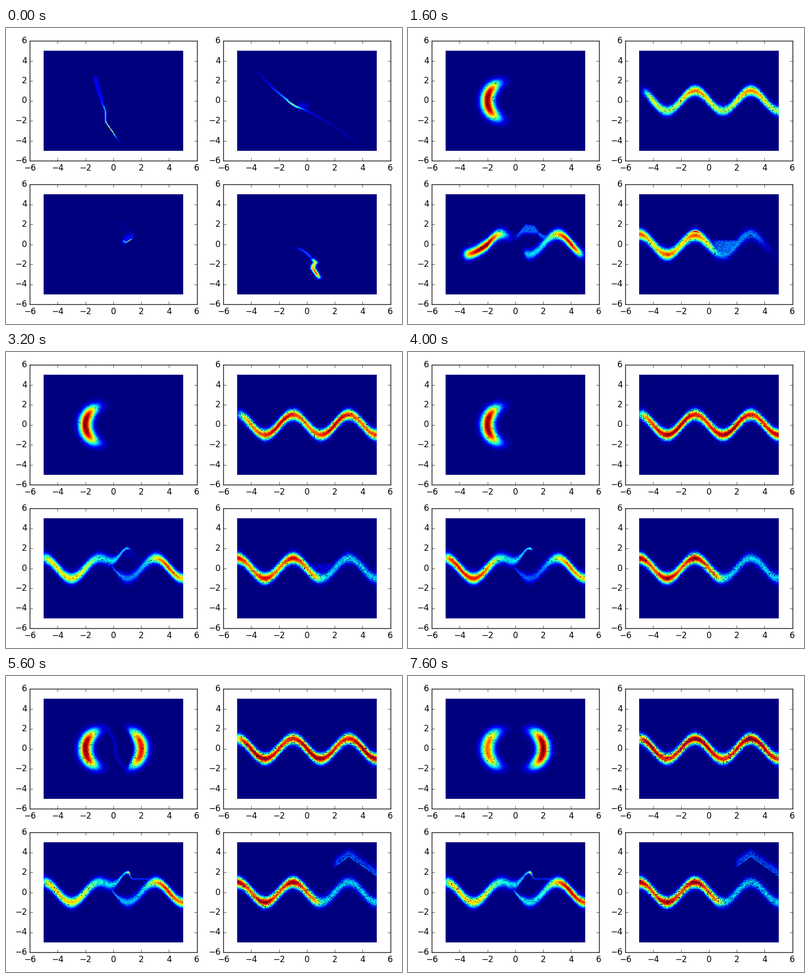
Animation of 800x600 px, one loop 8 s. Source, as a matplotlib script:

```python
import numpy as np
import matplotlib.pyplot as plt
from matplotlib.animation import FuncAnimation

FRAMES, INTERVAL, BINS = 20, 400, 200

plt.rcParams.update({
    "font.family": "DejaVu Sans", "font.size": 12, "axes.linewidth": 1.0,
    "xtick.direction": "in", "ytick.direction": "in",
    "xtick.top": True, "ytick.right": True,
    "xtick.major.size": 4, "ytick.major.size": 4,
    "xtick.major.width": 0.5, "ytick.major.width": 0.5,
    "xtick.major.pad": 4, "ytick.major.pad": 4,
    "ytick.alignment": "center",
})

centers = (np.arange(BINS) + 0.5) * 10 / BINS - 5
X, Y = np.meshgrid(centers, centers)
WAVE = -np.sin(np.pi * X / 2)
BUMPED = WAVE + 3 * np.exp(-0.5 * ((X - 1) / 0.6) ** 2)


def bell(d, width):
    return np.exp(-0.5 * (d / width) ** 2)


def step(d, soft=0.12):
    return 0.5 * (1 + np.tanh(d / (2 * soft)))


def ramp(frame, *points):
    """Straight-line easing through (frame, value) points."""
    return np.interp(frame, *zip(*points))


def path(along, across, width, *points):
    """Thin ridge following a line through a few points."""
    at, center = zip(*points)
    inside = step(along - at[0], .08) * step(at[-1] - along, .08)
    return inside * bell(across - np.interp(along, at, center), width)


def blend(*layers):
    return np.maximum.reduce(layers)


# Collapsed densities at the start of the loop
def start_one():
    height = .13 * step(Y + 4.2, .2) + .5 * bell(Y + 1.5, .6) + .65 * bell(Y + 2.9, .45)
    return height * path(Y, X, .03 + .08 * step(Y + .2, .3), (-4.6, .68),
                         (-2.3, -.47), (-2, -.57), (-1, -.57), (-.2, -.8), (2.4, -1.33))


def start_two():
    height = .05 + .3 * bell(X + 1, .35) + .25 * bell(X + 1.3, 1)
    line = path(X, Y, .08, (-3.6, 2.98), (-2.4, 1.2), (-1.2, -.2), (-.8, -.55),
                (-.2, -.85), (1.8, -2.4), (3.4, -3.95))
    glow = .09 * bell(X + .3, .25) * bell(Y + .5, .25)
    return blend(height * line, glow)


def start_three():
    line = path(X, Y, .035, (.8, .07), (1.37, .58))
    arc = path(Y, X, .06, (.6, 1.36), (1, 1.32), (1.8, .8), (2.5, 0))
    glow = .28 * bell(X - .78, .1) * bell(Y - .28, .14)
    wedge = .15 * bell(X - 1.05, .2) * bell(Y - .6, .25) * step(Y - .8 * X + .5, .05)
    return blend(.8 * bell(X - 1.05, .25) * line,
                 (.04 + .2 * bell(Y - .6, .3)) * arc, glow, wedge)


def start_four():
    tail = .22 * path(Y, X, .1, (-1.45, .4), (-.8, -.08), (-.35, -.65))
    body = path(Y, X, .12, (-3.35, .86), (-2.4, .43), (-2.1, .47),
                (-1.8, .62), (-1.5, .43))
    return blend(tail, (.66 + .2 * bell(Y + 2.8, .3)) * body)


def crescents(frame):
    if frame == 0:
        return start_one()
    ring = bell(np.hypot(X, Y) - 2, .37)
    left = ramp(frame, (14, 1), (17, .8)) * ring * bell(X + 2, .6)
    right = ramp(frame, (10, 0), (14, .9), (17, 1)) * ring * bell(X - 2, .6)
    cut = ramp(frame, (14, 1), (17, 0))
    right = right * (1 - cut * step(1.4 - .12 * Y ** 2 - X, .07))
    thread = path(Y, X, .08, (-2.2, .9), (-.8, .22), (.9, .02), (2.4, -.5))
    return blend(left, right, ramp(frame, (10, 0), (12, .12), (19, 0)) * thread)


def wave(frame):
    if frame == 0:
        return start_two()
    level = ramp(frame, (4, .66), (6, .82), (10, .93))
    ripple = ramp(frame, (4, .12), (10, .06)) * np.cos(1.6 * (X - 3) + .4 * frame - 1.6)
    reach = step(X + ramp(frame, (1, 4), (4, 4.5), (14, 5.1)), .2)
    reach = reach * step(ramp(frame, (1, 4.3), (4, 5.6)) - X, .15)
    return (level + ripple) * reach * bell(Y - WAVE, ramp(frame, (4, .35), (10, .38)))


def split_wave(frame):
    if frame == 0:
        return start_three()
    early = ramp(frame, (4, 1), (6, 0))

    # Left band, narrowing into a wing that ends in a bright tip
    stretched = np.where(X < -2, -2 + (X + 2) * (1 - .4 * early), X)
    bent = BUMPED - WAVE - np.sin(np.pi / 2 * stretched)
    level = ramp(frame, (4, .75), (6, .45), (10, .9), (14, .7))
    height = .35 + (level - .35) * step(-1.6 - X, .35) + .35 * early * bell(X + 1.9, .9)
    tip = ramp(frame, (8, 0), (14, .5)) * bell(X - 1.1, .08)
    edge = ramp(frame, (3, -3.2), (4, -3.6), (5, -3.9), (6, -5))
    wing = step(X - edge) * step((1 - early) * 1.8 - .6 - X, .04 + .2 * early)
    left = (height + tip) * wing * bell(Y - bent, .36 - .27 * step(X - .3, .2))

    # Right band, faint through the trough
    floor = ramp(frame, (4, .35), (10, .22), (17, .38))
    rise = step(X - 2.7, .3) * (.45 + .15 * bell(X - 3.8, .5))
    fade = step(ramp(frame, (6, 4.7), (10, 6)) - X, .15)
    right = (floor + rise) * fade * step(X + .15 - .8 * early, .06)
    right = right * bell(Y - WAVE, .07 + .27 * step(X - .4, .15))

    # Thin bridge between the two
    top = np.minimum(BUMPED + .2, 2.15 - .2 * X)
    base = np.minimum(1.05, BUMPED - .3)
    sheet = step(top - Y, .04) * step(Y - base, .08) * step(X, .1) * step(2.8 - X, .1)
    tail = step(X - 1.08, .02) * step(3 - X) * bell(Y - 1.33 - .7 * bell(X - 1.05, .12), .06)
    return blend(left, right, ramp(frame, (4, .23), (6, .12), (9, 0)) * sheet,
                 ramp(frame, (9, 0), (14, .2)) * (1 + 2 * bell(X - 1.1, .1)) * tail)


def forked_wave(frame):
    if frame == 0:
        return start_four()
    early = ramp(frame, (4, 1), (8, 0))
    low = ramp(frame, (4, .28), (6, .35))
    high = ramp(frame, (4, .75), (10, .9)) + .08 * np.cos(np.pi * (X + 1))
    reach = step(ramp(frame, (4, 4), (6, 5), (10, 7)) - X, .3)
    main = (low + (high - low) * step(.7 - .4 * early - X, .18)) * reach
    main = main * bell(Y - WAVE + .12 * early * bell(X + 1, 1), .38)

    strand = ramp(frame, (4, .95), (6, 0)) * bell(X + .95, .45) * bell(Y - WAVE - .28, .1)
    fan = step(np.maximum(.4, WAVE + .45) - Y, .05) * step(Y - WAVE + .4, .07)
    fan = ramp(frame, (4, .24), (6, .33), (9, 0)) * fan * step(X - .3, .1) * step(
        ramp(frame, (4, 3.5), (6, 2.3)) - X, .15)

    # Detached branch that appears late
    offset = Y - 3.55 + .98 * np.abs(X - 3)
    sheet = .2 * step(offset, .03) * bell(np.maximum(offset - .4, 0), .3)
    branch = blend(sheet, .28 * bell(offset - .04, .05)) * step(X - 1.95, .08)
    return blend(main, strand, fan, (frame >= 12) * branch)


PANELS = [(crescents, .2), (wave, 1), (split_wave, .4), (forked_wave, 1)]


def sample(panel, frame):
    """Density with the empty bins a finite sample leaves behind."""
    field, sparsity = PANELS[panel]
    density = field(frame)
    if frame == 0:
        return density
    rng = np.random.default_rng(100 * frame + panel)
    empty = sparsity * ramp(frame, (4, .03), (10, .07), (19, .12))
    chance = empty + (.1 + .4 * sparsity) * (1 - np.clip(density, 0, 1)) ** 5
    return np.where(rng.random(X.shape) < chance, 0, density)


fig = plt.figure(figsize=(8, 6), dpi=100, facecolor="white")
images = []
for bottom in (331, 40):
    for left in (48.1, 439.05):
        ax = fig.add_axes([left / 800, bottom / 600, 337.5 / 800, 243 / 600])
        images.append(ax.imshow(
            np.zeros_like(X), cmap="jet", vmin=0, vmax=1, origin="lower",
            extent=(-5, 5, -5, 5), aspect="auto", interpolation="nearest"))
        ax.set(xlim=(-6, 6), ylim=(-6, 6),
               xticks=range(-6, 7, 2), yticks=range(-6, 7, 2))


def update(frame):
    for panel, image in enumerate(images):
        image.set_data(sample(panel, frame))
    return images


anim = FuncAnimation(fig, update, frames=FRAMES, interval=INTERVAL,
                     repeat=True, repeat_delay=0)
plt.show()
```
